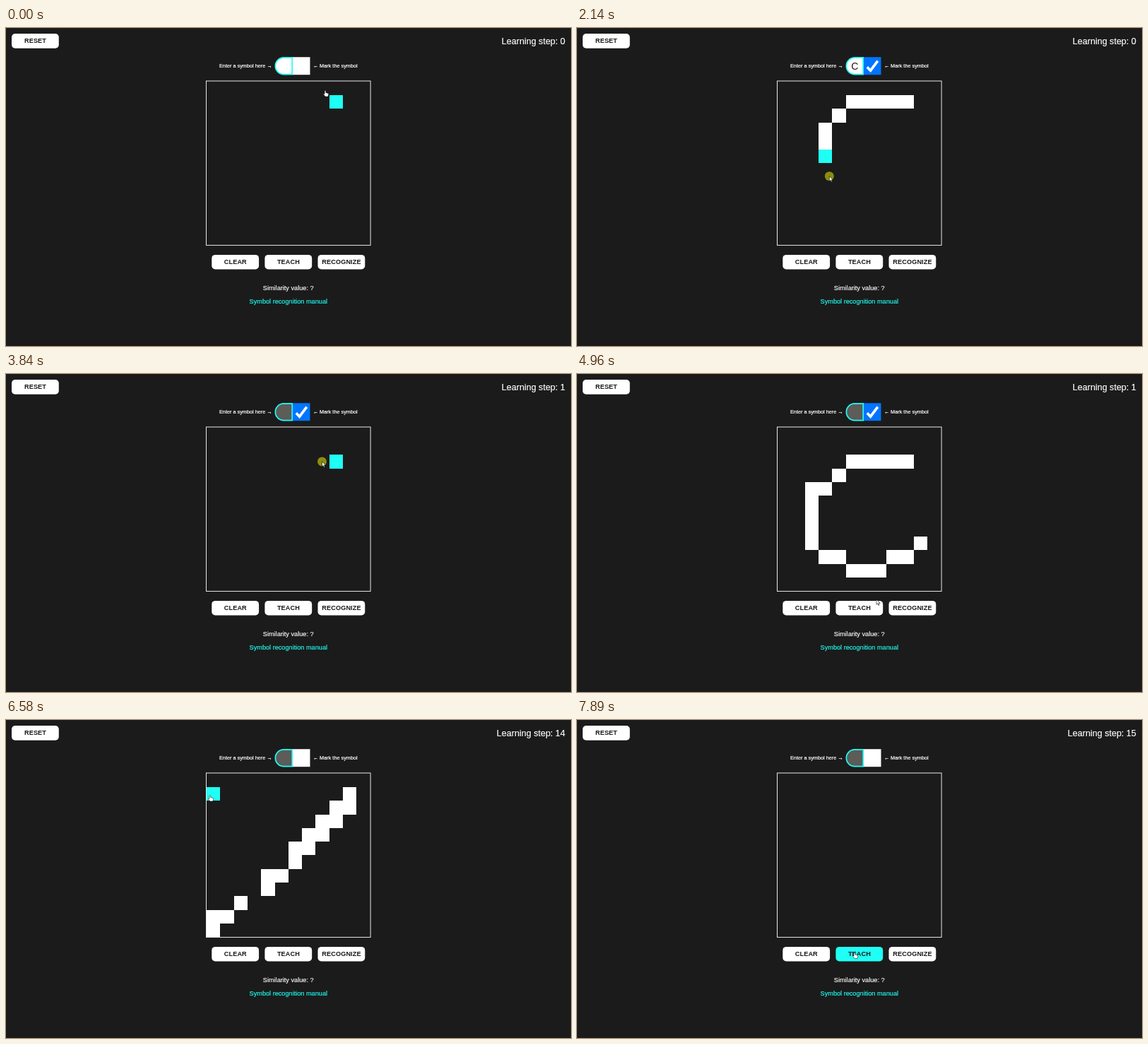
Animation, 800 px wide and 450 px high, one loop 7.99 s. Source, as an HTML page:

```html
<!DOCTYPE html>
<html lang="en">
<head>
<meta charset="utf-8">
<title>Symbol recognition</title>
<style>
  html, body { margin: 0; width: 100%; height: 100%; overflow: hidden; background: #1b1b1b; }
  svg { display: block; width: 800px; height: 450px; font-family: "Liberation Sans", Arial, sans-serif; fill: #fff; }
  .button text { font-weight: bold; font-size: 9.17px; letter-spacing: .1px; text-anchor: middle; fill: #1b1b1b; }
  .label { font-size: 7.3px; stroke: #fff; stroke-width: .2px; }
  .line { font-size: 9.17px; text-anchor: middle; stroke: #fff; stroke-width: .15px; }
  .cyan { fill: #20fff5; }
  .line.cyan { stroke: #20fff5; }
  .cells { shape-rendering: crispEdges; }
</style>
</head>
<body>
<svg viewBox="0 0 800 450">
  <g id="buttons"></g>
  <text id="counter" x="791.8" y="22.9" font-size="12.55" text-anchor="end" stroke="#fff" stroke-width=".15"></text>
  <text class="label" x="302" y="56.3">Enter a symbol here →</text>
  <text class="label" x="434.8" y="56.3">← Mark the symbol</text>
  <rect id="box" x="405.5" y="41.2" width="25" height="25"/>
  <path id="tick" d="M410.8 55.2L415.6 60.2L425.8 46.6" fill="none" stroke="#fff" stroke-width="3.6"/>
  <path id="input" d="M405.2 41.9V65.6H393.2A11.85 11.85 0 0 1 393.2 41.9Z" stroke="#20fff5" stroke-width="1.7"/>
  <text id="symbol" x="393.3" y="58.7" font-size="14" text-anchor="middle" fill="#1b1b1b">C</text>
  <rect x="283.5" y="75" width="232.6" height="232.4" fill="none" stroke="#fff" stroke-width=".9"/>
  <path id="drawn" class="cells"/>
  <path id="hover" class="cells cyan"/>
  <g id="list"></g>
  <text class="line" x="399.7" y="370.7">Similarity value: ?</text>
  <text class="line cyan" x="399.8" y="389.6">Symbol recognition manual</text>
  <g id="pointer">
    <circle id="press" r="6.5" fill="#ff0" opacity=".5"/>
    <path id="arrow" d="M0 0V7.2L1.7 5.7L2.9 8.4L4.1 7.9L2.9 5.2H5.2Z" stroke="#000" stroke-width=".6"/>
    <path id="hand" d="M-.9 .6Q0 -.6 .9 .6V3L4.4 4Q5 4.4 4.7 6L3.9 8.6H.2L-2.6 5.2Q-2.4 4-.9 5Z" stroke="#000" stroke-width=".5"/>
  </g>
</svg>
<script>
const LOOP = 7990, LAST_STEP = 78, CELL = 19.31, LEFT = 284, TOP = 75.6;
const $ = id => document.getElementById(id);
const show = (id, on) => $(id).style.display = on ? "" : "none";
const mix = (a, b, k) => a + (b - a) * k;
const mixPoint = (a, b, k) => [mix(a[0], b[0], k), mix(a[1], b[1], k)];
const inside = ([x, y], l, t, r, b) => x >= l && x < r && y >= t && y < b;
const toStage = ([col, row]) => [LEFT + CELL * (col + .5), TOP + CELL * (row + .5)];

// Samples a polyline in grid units, `detail` samples per cell.
function trace(points, detail = 1) {
  const samples = points.slice(0, 1);
  for (let p = 1; p < points.length; p++) {
    const a = points[p - 1], b = points[p];
    const count = Math.ceil(detail * Math.max(Math.abs(b[0] - a[0]), Math.abs(b[1] - a[1])));
    for (let i = 1; i <= count; i++) samples.push(mixPoint(a, b, i / count));
  }
  return samples;
}

const strokes = [
  { start: 16, end: 25, clear: 29, power: 1,
    path: trace([[9, 1], [5, 1], [3, 3], [3, 6], [5, 9], [9, 9], [10, 8]]) },
  { start: 37, end: 45, clear: 52, power: 1.4,
    path: trace([[9, 2], [5, 2], [2, 4.4], [2, 8], [5, 10], [7, 10], [10, 8]]) },
  // A fast diagonal that skips cells near its lower end.
  { start: 56, end: 61, clear: 77, power: 1,
    path: [[[10.25, 1.1], [5.75, 5.6]], [[4.75, 6.6], [3.75, 7.6]], [[2, 9]], [[1, 10], [0, 10], [0, 11]]]
      .flatMap(run => trace(run, 2)) },
  { start: 65, end: 72, clear: 77, power: 1, path: trace([[-.25, 1.1], [8.75, 10.1]], 2) }
];

// Where the pointer rests between strokes, by step.
const INPUT = [393, 54], TICK = [421.5, 56.5], TEACH = [393, 329];
const stops = [
  [-1, [462, 97]], [0, [452, 88.5]], [5, INPUT], [9, INPUT], [12, TICK],
  [28, TEACH], [29, [406, 316]], [49, [424, 319]], [51, TEACH], [53, TICK], [76, TEACH],
  ...strokes.flatMap(s => [[s.start, toStage(s.path[0])], [s.end, toStage(s.path.at(-1))]])
].sort((a, b) => a[0] - b[0]);

function progress(s, step) {
  const k = Math.min(1, Math.max(0, (step - s.start) / (s.end - s.start)));
  return k ** s.power * (s.path.length - 1);
}

const strokeAt = step => strokes.find(s => step > s.start && step <= s.end);

function pointerAt(step) {
  const s = strokeAt(step);
  if (s) {
    const at = progress(s, step), i = Math.floor(at);
    return toStage(mixPoint(s.path[i], s.path[i + 1] || s.path[i], at - i));
  }
  const next = stops.findIndex(stop => stop[0] >= step);
  if (next < 1) return stops.at(next)[1];
  const [from, a] = stops[next - 1], [to, b] = stops[next];
  return mixPoint(a, b, 1 - (1 - (step - from) / (to - from)) ** 3);
}

function square([col, row]) {
  const x = Math.round(LEFT + col * CELL), y = Math.round(TOP + row * CELL);
  const r = Math.round(LEFT + (col + 1) * CELL), b = Math.round(TOP + (row + 1) * CELL);
  return `M${x} ${y}H${r}V${b}H${x}Z`;
}

const button = (name, x, y) => `<g class="button"><rect id="${name}" x="${x}" y="${y}" width="66.8" height="20.6" rx="5"/>
  <text x="${x + 33.5}" y="${y + 13.3}">${name}</text></g>`;
$("buttons").innerHTML = button("RESET", 8, 8.1) +
  ["CLEAR", "TEACH", "RECOGNIZE"].map((name, i) => button(name, 291.3 + 75.1 * i, 320.9)).join("");

function drawList(step) {
  const items = step >= 4 && step < 9 ? "CcAXOS" : step >= 9 && step < 13 ? "Cc" : "";
  $("list").setAttribute("opacity", step === 12 ? .55 : 1);
  $("list").innerHTML = items && `<rect x="382.5" y="67" width="97" height="${8 + 18.7 * items.length}" rx="2" fill="#252529"/>` +
    [...items].map((item, i) => `<text x="388.5" y="${83 + 18.7 * i}" font-size="6.2" fill="#b4b4b4">${item}</text>`).join("");
}

function draw(step) {
  const felt = pointerAt(step - 1); // hover effects trail by one step
  const ticked = step >= 12 && step < 53;
  const pressed = !!strokeAt(step);
  const onGrid = inside(felt, LEFT, TOP, LEFT + 12 * CELL, TOP + 12 * CELL);
  const onTeach = inside(felt, 366, 320, 433, 342);
  const onBox = inside(felt, 405, 41, 431, 66);

  $("counter").textContent = "Learning step: " + (step < 29 ? 0 : step < 52 ? 1 : step < 77 ? 14 : 15);
  $("TEACH").setAttribute("class", onTeach ? "cyan" : "");
  $("box").setAttribute("fill", !ticked ? "#fff" : onBox ? "#005cc8" : "#0075ff");
  $("input").setAttribute("fill", step < 29 ? "#fff" : "#5c5c59");
  show("tick", ticked);
  show("symbol", step >= 9 && step < 29);
  drawList(step);

  $("drawn").setAttribute("d", strokes
    .filter(s => step > s.start && step < s.clear)
    .flatMap(s => s.path.slice(0, Math.round(progress(s, step - 1)) + 1))
    .map(point => square(point.map(Math.round))).join(""));
  const cell = [Math.floor((felt[0] - LEFT) / CELL), Math.floor((felt[1] - TOP) / CELL)];
  $("hover").setAttribute("d", onGrid ? square(cell) : "");

  const hand = (onGrid || onTeach) && !pressed;
  $("pointer").setAttribute("transform", `translate(${pointerAt(step)})`);
  show("press", pressed);
  show("hand", hand);
  show("arrow", !hand);
}

// Steps last 100 ms, with 20 ms slipped in every 2420 ms.
function stepAt(time) {
  const slip = 20 * (1 + Math.floor((time + 780) / 2420));
  return Math.min(LAST_STEP, Math.max(0, Math.floor((time - slip) / 100)));
}

const begin = performance.now();
let shown = -1;
function tick() {
  const step = stepAt((performance.now() - begin) % LOOP);
  if (step !== shown) draw(shown = step);
  requestAnimationFrame(tick);
}
tick();
</script>
</body>
</html>
```
